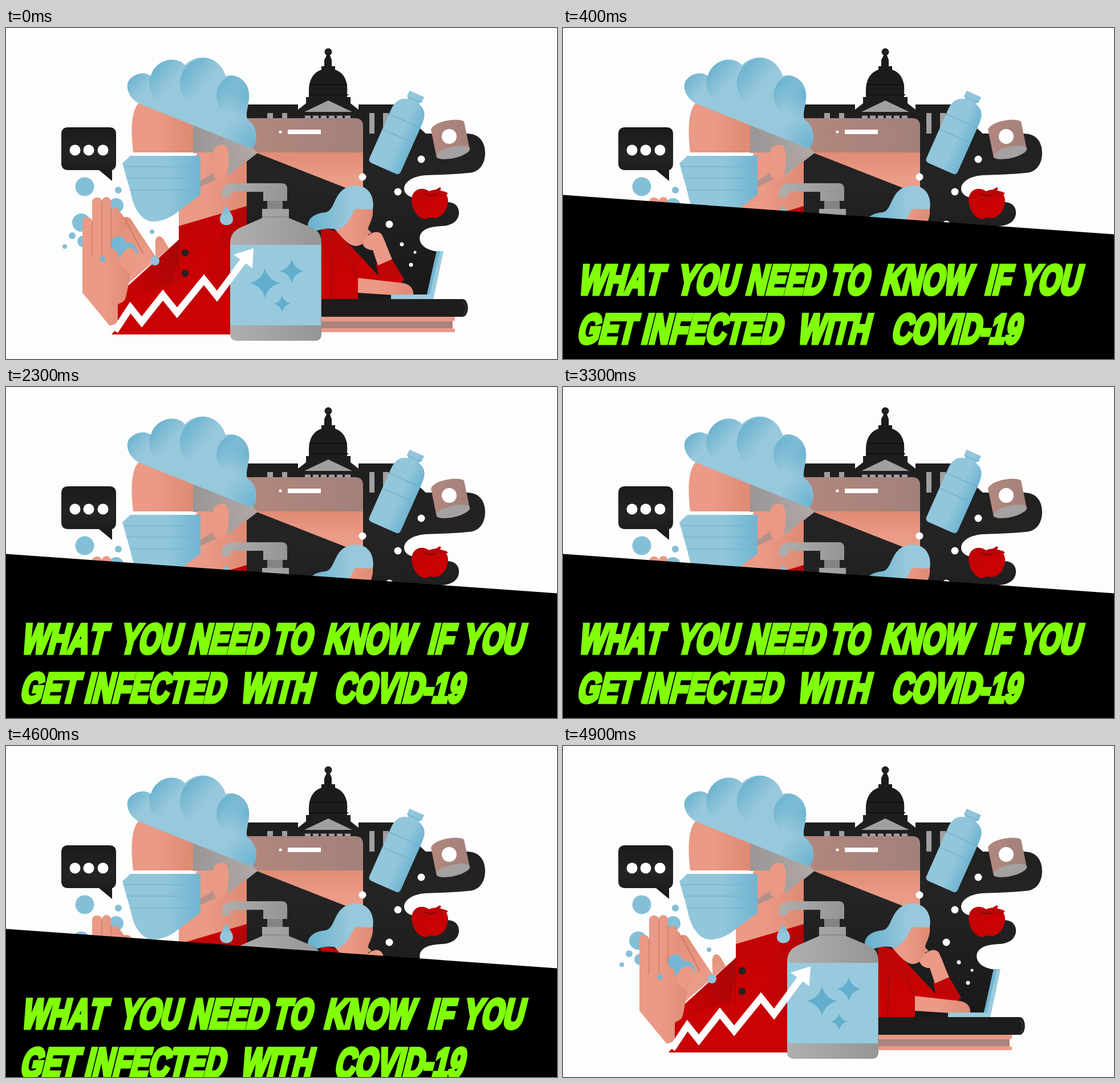
Recreate the animation shown at these times as an HTML page. Size 966x580 px, loop 5 s.

```html
<!DOCTYPE html>
<html lang="en">
<head>
<meta charset="utf-8">
<title>What you need to know</title>
<style>
  html, body { margin: 0; width: 100%; height: 100%; overflow: hidden; background: #fdfdfd; }
  svg { display: block; width: 966px; height: 580px; }
  #headline text {
    font: bold 72px "Liberation Sans", Arial, sans-serif;
    font-kerning: none;
    fill: #80ff08; stroke: #80ff08; stroke-width: 7; stroke-linejoin: miter; stroke-miterlimit: 3;
  }
</style>
</head>
<body>
<svg viewBox="0 0 966 580">
  <defs>
    <linearGradient id="blue"><stop stop-color="#67b1cf"/><stop offset=".65" stop-color="#98c8db"/></linearGradient>
    <linearGradient id="blueRight"><stop offset=".55" stop-color="#92c6db"/><stop offset="1" stop-color="#70b5d1"/></linearGradient>
    <linearGradient id="blueDown" x2="0" y2="1"><stop stop-color="#74b8d4"/><stop offset=".6" stop-color="#94c7dc"/></linearGradient>
    <linearGradient id="lobe" x2=".55" y2=".45"><stop offset=".2" stop-color="#67b1cf"/><stop offset="1" stop-color="#67b1cf" stop-opacity="0"/></linearGradient>
    <radialGradient id="glow"><stop stop-color="#67b1cf" stop-opacity=".9"/><stop offset="1" stop-color="#67b1cf" stop-opacity="0"/></radialGradient>
    <linearGradient id="skin"><stop offset=".4" stop-color="#ea9a86"/><stop offset="1" stop-color="#de8a74"/></linearGradient>
    <linearGradient id="skinDown" x2="0" y2="1"><stop stop-color="#e08b75"/><stop offset=".7" stop-color="#eb9c88"/></linearGradient>
    <linearGradient id="red" x2=".5" y2="1"><stop stop-color="#b80607"/><stop offset=".6" stop-color="#c90204"/></linearGradient>
    <linearGradient id="fold"><stop stop-color="#7d0c0c" stop-opacity="0"/><stop offset="1" stop-color="#7d0c0c" stop-opacity=".65"/></linearGradient>
    <linearGradient id="grey"><stop stop-color="#b0aeae"/><stop offset=".5" stop-color="#a3a2a2"/><stop offset="1" stop-color="#969595"/></linearGradient>
    <linearGradient id="band"><stop stop-color="#999696"/><stop offset="1" stop-color="#b2a9a7"/></linearGradient>
    <linearGradient id="brown"><stop stop-color="#b2877e"/><stop offset="1" stop-color="#a2817a"/></linearGradient>
    <linearGradient id="black" x2="0" y2="1"><stop stop-color="#1a1a1a"/><stop offset=".5" stop-color="#242424"/><stop offset="1" stop-color="#181818"/></linearGradient>
    <path id="cap" d="M232 132C213 121 207 98 219 88C230 78 245 77 254 84C262 56 296 46 314 65C334 43 374 48 385 84C407 79 429 95 426 125C424 141 420 150 423 160C440 170 443 195 434 208C430 211 425 209 420 207Z"/>
    <clipPath id="capClip"><use href="#cap"/></clipPath>
    <path id="spark" d="M0-1Q.2-.2 1 0Q.2.2 0 1Q-.2.2-1 0Q-.2-.2 0-1Z"/>
  </defs>

  <g id="picture">
    <!-- capitol and dark cloud -->
    <g fill="url(#black)">
      <path d="M421 134H512V143L526 132V121H531V114C530 92 538 78 553 73V67H558V56L562 48H568L571 56V67H577V73C592 78 600 92 598 114V121H604V132L618 143V134H680L736 185H808C830 185 840 200 840 219C840 240 828 254 810 254C795 256 760 257 735 258C712 260 698 270 698 282C699 294 712 298 722 298C745 300 758 305 775 305C790 306 795 316 794 326C792 340 780 346 765 347C748 348 732 350 726 363C722 378 735 390 760 392L741 476H421Z"/>
      <circle cx="565" cy="42" r="6.5"/>
    </g>
    <path d="M532 99H598M531 117H600" stroke="#101010" stroke-width="2"/>
    <g fill="#a19f9f">
      <path d="M523 147L565 127L607 147Z"/>
      <path d="M458 149h10v9h-10zM484 149h9v9h-9zM637 149h9v36h-9zM661 149h10v29h-10z"/>
      <path d="M524 156H606" stroke="#a19f9f" stroke-width="5" stroke-dasharray="10 4"/>
    </g>

    <!-- phone -->
    <path d="M421 158H612Q626 158 626 172V219H421Z" fill="url(#brown)"/>
    <path d="M437 218H626V283H603Z" fill="url(#skinDown)"/>
    <circle cx="481" cy="182" r="2.5" fill="#fff"/>
    <path d="M494 178h58v8h-58z" fill="#fff"/>

    <!-- head and coat -->
    <path d="M233 131C218 146 219 185 223 218H328V170Z" fill="url(#skin)"/>
    <path d="M328 169L430 207L441 219L391 258L341 219H328Z" fill="url(#band)"/>
    <path d="M335 218H362L391 258L422 232V315L303 350V300Z" fill="url(#skin)"/>
    <path d="M391 250L440 219L400 238Z" fill="#a5a1a0"/>
    <path d="M341 278V268L366 252L372 264Z" fill="#b39189"/>
    <path d="M363 219C364 207 375 202 385 206C392 212 391 235 389 249C386 262 376 271 368 264C359 258 367 249 363 236Z" fill="#eb9985"/>
    <path d="M422 312L303 347V371L196 468V524L185 537H422Z" fill="url(#red)"/>
    <path d="M303 371V405L292 448L222 470L215 450Z" fill="url(#fold)" opacity=".6"/>
    <path d="M421 312V346L394 385V480L350 430L385 340Z" fill="url(#fold)" opacity=".4"/>
    <path d="M303 371L302 450" stroke="#a00a0a" stroke-width="2"/>
    <g fill="#2b2020"><circle cx="314" cy="394" r="6.5"/><circle cx="314" cy="430" r="6.5"/></g>

    <use href="#cap" fill="#97c8dc"/>
    <g clip-path="url(#capClip)" fill="url(#lobe)">
      <circle cx="243" cy="108" r="33"/>
      <circle cx="291" cy="96" r="40"/>
      <circle cx="350" cy="97" r="45"/>
      <circle cx="407" cy="119" r="38"/>
      <g fill="url(#glow)"><circle cx="427" cy="115" r="48"/><circle cx="437" cy="205" r="60"/></g>
    </g>
    <path d="M218 224H341V292L296 326C278 338 262 341 250 338C232 331 222 310 218 286L204 237Z" fill="url(#blueRight)"/>
    <path d="M207 243H341M211 263H341M217 284H341" stroke="#71b5d1" stroke-width="2" opacity=".65"/>
    <path d="M223 218H326V224H223Z" fill="#fff"/>

    <!-- speech bubble -->
    <path d="M109 174H181Q193 174 193 186V237Q193 247 186 249V268L163 249H109Q97 249 97 237V186Q97 174 109 174Z" fill="url(#black)"/>
    <g fill="#fff"><circle cx="121" cy="214" r="9.5"/><circle cx="145" cy="214" r="9.5"/><circle cx="170" cy="214" r="9.5"/></g>

    <!-- hands and soap -->
    <g fill="#84bfd8">
      <circle cx="138" cy="278" r="16.5"/><circle cx="197" cy="284" r="6"/><circle cx="132" cy="341" r="16"/>
      <circle cx="193" cy="311" r="13"/><circle cx="116" cy="364" r="6"/><circle cx="103" cy="383" r="4"/>
      <circle cx="135" cy="374" r="10"/><circle cx="256" cy="357" r="4"/>
    </g>
    <path d="M184 324C190 313 200 320 207 332C218 327 222 340 228 349L262 400C263 386 258 367 268 365C277 365 279 378 286 386L215 447L184 430Z" fill="url(#skinDown)"/>
    <path d="M207 332L240 395" stroke="#ce7b67" stroke-width="2"/>
    <circle cx="261" cy="408" r="8" fill="#8fc4da"/>
    <path d="M134 338C135 329 149 329 151 338V304C152 295 166 295 168 303C170 294 183 294 184 304V320C191 308 201 318 201 328V398C203 382 228 384 229 400C228 411 223 420 218 432L211 468C208 483 201 480 196 485V517L182 522L134 464Z" fill="url(#skin)"/>
    <path d="M151 338V400M168 303V398M184 315V385" stroke="#d58370" stroke-width="2" fill="none"/>
    <g fill="#75b7d4"><circle cx="197" cy="378" r="13"/><circle cx="213" cy="394" r="18"/><circle cx="170" cy="405" r="5"/></g>
    <path d="M198 413C198 388 225 375 230 397C230 409 223 420 218 432Z" fill="#ea9985"/>

    <!-- woman at the desk -->
    <path d="M552 352C575 350 586 360 594 371L654 435L649 414L676 404L698 441L690 449L617 446V476H552Z" fill="url(#red)"/>
    <path d="M654 437L649 414L676 404L698 441Z" fill="#bf0607"/>
    <path d="M594 390L617 438M569 476L572 400" stroke="#9c0c0c" stroke-width="2"/>
    <path d="M617 438L697 447C711 450 715 460 714 468H680L617 464Z" fill="url(#skin)"/>
    <path d="M576 352C594 344 600 316 614 317H643C645 335 634 347 635 353L641 359L635 362C634 372 629 379 615 382C603 383 590 369 576 352Z" fill="url(#skin)"/>
    <path d="M627 372C634 362 650 351 659 362C666 376 670 390 677 405L652 416L643 389C636 390 621 383 627 372Z" fill="#ea9a86"/>
    <path d="M529 346C530 331 545 324 560 323C580 320 572 278 613 276C637 276 647 298 643 318L613 317C606 323 604 343 582 354C568 349 552 353 546 355C538 355 531 352 529 346Z" fill="url(#blue)"/>
    <path d="M755 391H767L749 476H675V467H738Z" fill="#9acbdd"/>
    <path d="M755 391H761L743 467H738Z" fill="#70b5d1"/>
    <path d="M553 475H800C813 475 813 506 800 506H553Z" fill="#1d1d1d"/>
    <path d="M800 480C808 484 808 498 800 503" stroke="#333" stroke-width="2" fill="none"/>
    <path d="M553 506H787V513H783V527H787V533H553Z" fill="#e79a87"/>
    <path d="M553 514H783V526H553Z" fill="#aa857d"/>

    <!-- floating goods -->
    <g transform="translate(662 246)rotate(24)">
      <path d="M-30-7Q-30 0-23 0H23Q30 0 30-7V-98C30-117 23-125 11-128V-132H14V-143H-14V-132H-11V-128C-23-125-30-117-30-98Z" fill="url(#blueRight)"/>
      <path d="M-30-91H30M-30-62H30M-13-132H13" stroke="#68b0ce" stroke-width="2" opacity=".7"/>
    </g>
    <path d="M745 178C750 163 793 156 803 164L813 212C805 224 765 235 755 227Z" fill="url(#brown)"/>
    <ellipse cx="784" cy="218" rx="30" ry="10" transform="rotate(-13 784 218)" fill="#a4a1a0"/>
    <circle cx="777" cy="190" r="13" fill="#fff"/>
    <path d="M711 302C711 284 727 276 742 286C757 279 776 286 775 304C774 320 764 332 752 333L743 332L735 335C722 333 712 319 711 302Z" fill="url(#red)"/>
    <path d="M749 293Q750 283 761 279L763 282Q755 287 754 293ZM756 291Q766 282 775 290Q766 297 756 291Z" fill="#b80607"/>
    <path d="M734 291Q744 297 754 291" stroke="#6e0d0d" stroke-width="2" fill="none"/>
    <g fill="#fff">
      <circle cx="625" cy="261" r="6.5"/><circle cx="687" cy="287" r="6.5"/><circle cx="728" cy="230" r="6.5"/>
      <circle cx="672" cy="344" r="6.5"/><circle cx="694" cy="379" r="3.5"/><circle cx="717" cy="393" r="2.5"/><circle cx="710" cy="415" r="3.5"/>
    </g>

    <!-- sanitizer -->
    <path d="M378 297V290C378 279 387 272 398 272H484Q493 272 493 282V303H451V287H402C394 287 393 291 392 297Z" fill="url(#grey)"/>
    <path d="M458 303h27v15h-27z" fill="#858484"/>
    <path d="M449 317H496V333L537 350C550 357 553 365 553 379V536Q553 548 542 548H405Q393 548 393 536V379C393 365 397 357 410 350L449 333Z" fill="url(#grey)"/>
    <path d="M393 380H552V521H393Z" fill="#98cade"/>
    <path d="M449 331H496" stroke="#8d8c8c" stroke-width="2"/>
    <path d="M386 310C390 321 398 326 398 335C398 349 375 349 375 335C375 326 383 321 386 310Z" fill="url(#blueDown)"/>
    <g fill="#63aecd">
      <use href="#spark" transform="translate(454 447)scale(27 26)"/>
      <use href="#spark" transform="translate(501 426)scale(21)"/>
      <use href="#spark" transform="translate(484 483)scale(14.5)"/>
    </g>

    <!-- rising arrow -->
    <path d="M191 531L218 490L238 515L275 468L300 499L347 441L370 470L416 408" fill="none" stroke="#fff" stroke-width="12" stroke-miterlimit="6"/>
    <path d="M434 386L399 397L432 421Z" fill="#fff"/>
  </g>

  <g id="headline">
    <path d="M0 292.5L966 361.5V960H0Z"/>
  </g>
</svg>
<script>
  const headline = document.getElementById('headline');
  const lines = [
    { y: 466, words: [['WHAT', 25], ['YOU', 197], ['NEED', 319], ['TO', 465], ['KNOW', 556], ['IF', 738], ['YOU', 798]] },
    { y: 552, words: [['GET', 23], ['INFECTED', 136], ['WITH', 409], ['COVID-19', 574]] }
  ];

  for (const { y, words } of lines) {
    for (const [word, x] of words) {
      const text = document.createElementNS('http://www.w3.org/2000/svg', 'text');
      text.textContent = word;
      text.setAttribute('transform', `translate(${x} ${y}) skewX(-14) scale(.68 1)`);
      headline.append(text);
    }
  }

  // [time in ms, distance below the resting place]
  const steps = [[0, 322], [100, 277], [200, 161], [300, 45], [400, 0], [4600, 28], [4700, 107], [4800, 215], [4900, 322], [5000, 322]];
  headline.animate(
    steps.map(([time, drop]) => ({
      offset: time / 5000,
      transform: `translateY(${drop}px)`,
      easing: 'steps(1, end)'
    })),
    { duration: 5000, iterations: Infinity }
  );
</script>
</body>
</html>
```
